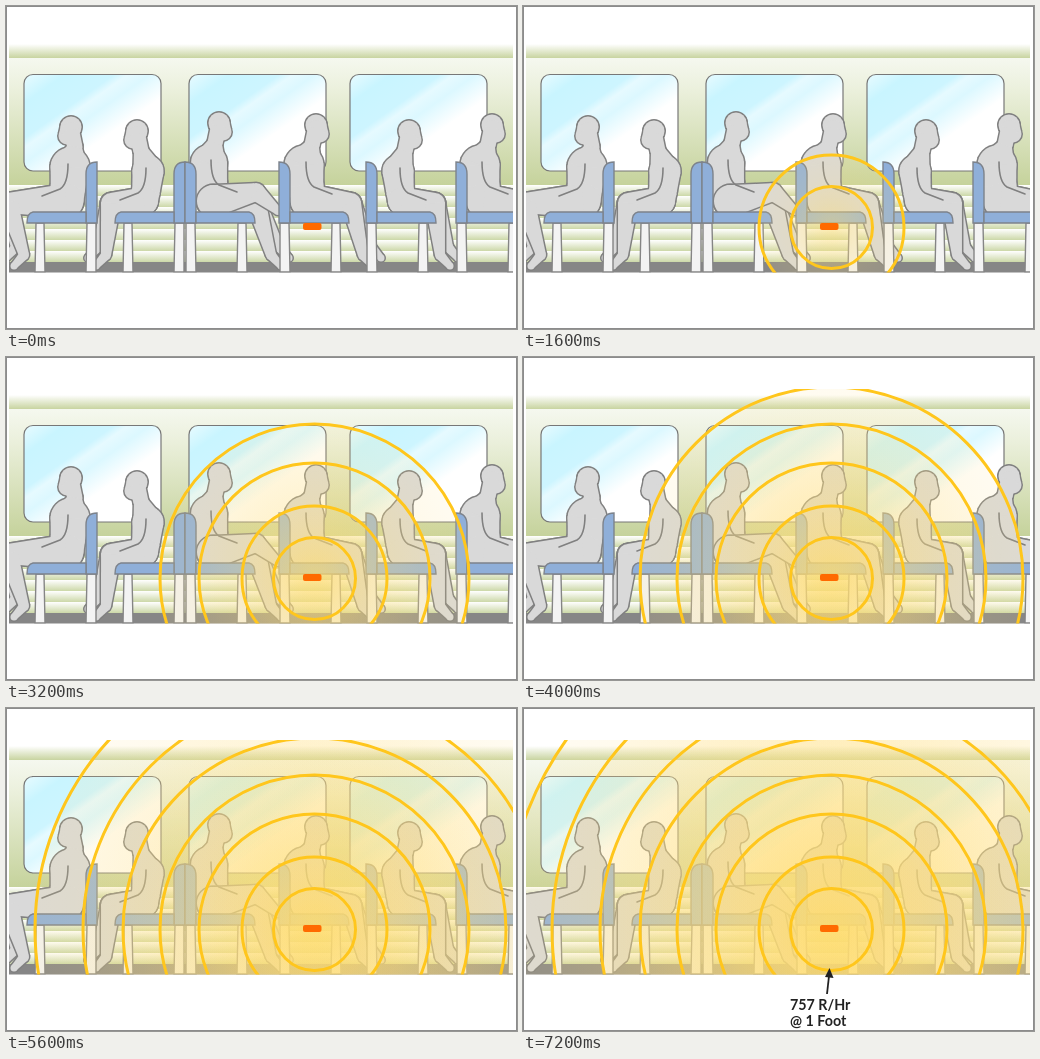
An HTML page that plays this animation: 511x323 px, repeating every 8000 ms.

```html
<!DOCTYPE html>
<html lang="en">
<head>
<meta charset="utf-8">
<style>
  html, body { margin: 0; width: 100%; height: 100%; overflow: hidden; background: #fff; }
  svg { display: block; }
  .ink { fill: #808080; stroke: #808080; stroke-width: 3; stroke-linejoin: round; }
  .skin { fill: #d9d9d9; }
  .crease { fill: none; stroke: #808080; stroke-width: 1.6; stroke-linecap: round; }
  .seat { fill: #8fafd9; stroke: #7d838c; stroke-width: 1.4; }
  .leg { fill: #f3f3f3; stroke: #858585; stroke-width: 1.4; }
  .ring { fill: none; stroke: #ffc61c; stroke-width: 3; }
  text { font: bold 14.3px Lato, "Open Sans", sans-serif; fill: #222; }
</style>
</head>
<body>
<svg width="511" height="323" viewBox="0 0 511 323">
  <defs>
    <clipPath id="car"><rect x="3" y="32" width="504" height="234.5"/></clipPath>
    <linearGradient id="roof" x2="0" y2="1">
      <stop stop-color="#fff"/><stop offset="1" stop-color="#c8d4a0"/>
    </linearGradient>
    <linearGradient id="wall" x2="0" y2="1">
      <stop stop-color="#f5f8ef"/><stop offset=".25" stop-color="#ebf0dc"/><stop offset="1" stop-color="#c5d29b"/>
    </linearGradient>
    <linearGradient id="slat" x2="0" y2="1">
      <stop stop-color="#fff"/><stop offset="1" stop-color="#ccd8a8"/>
    </linearGradient>
    <linearGradient id="glass" x2="1" y2="1">
      <stop stop-color="#e8fbff"/><stop offset=".15" stop-color="#c9f5ff"/><stop offset=".33" stop-color="#cdf5ff"/>
      <stop offset=".38" stop-color="#e6faff"/><stop offset=".46" stop-color="#dcf8ff"/><stop offset=".62" stop-color="#fff"/>
    </linearGradient>
    <radialGradient id="glow">
      <stop stop-color="#ffdc6e" stop-opacity=".3"/><stop offset="1" stop-color="#ffe08a" stop-opacity=".12"/>
    </radialGradient>
  </defs>
  <rect x=".5" y=".5" width="510" height="322" fill="#fff" stroke="#8c8c8c"/>
  <g clip-path="url(#car)">
    <g id="scene"></g>
    <g id="glows"></g>
    <g id="rings"></g>
  </g>
  <rect x="297" y="217" width="18.5" height="7" rx="2" fill="#ff6a00"/>
  <g id="label">
    <path d="M304 286L306 268" stroke="#222" stroke-width="1.8"/>
    <path d="M306.5 260L310.5 270L302 269Z" fill="#222"/>
    <text x="267" y="302">757 R/Hr</text>
    <text x="267" y="318">@ 1 Foot</text>
  </g>
</svg>
<script>
const $ = id => document.getElementById(id);
const rect = (x, y, w, h, fill, extra = '') =>
  `<rect x="${x}" y="${y}" width="${w}" height="${h}" fill="${fill}" ${extra}/>`;

// Chain of tapered segments through joints [x, y, radius]
function limb(...joints) {
  return joints.map(([x, y, r], i) => {
    const dot = `<circle cx="${x}" cy="${y}" r="${r}"/>`;
    if (!i) return dot;
    const [px, py, pr] = joints[i - 1];
    const length = Math.hypot(x - px, y - py), nx = (py - y) / length, ny = (x - px) / length;
    return dot + `<path d="M${px + nx * pr} ${py + ny * pr}L${x + nx * r} ${y + ny * r}` +
      `L${x - nx * r} ${y - ny * r}L${px - nx * pr} ${py - ny * pr}Z"/>`;
  }).join('');
}

const outlined = shape => `<g class="ink">${shape}</g><g class="skin">${shape}</g>`;

// Seated figure: x, y is the head; lean, knee and ankle are measured forward from it
function person({ x, y, dir = 1, build = 1, lean, knee, ankle, crossed }) {
  const chest = [lean, 37, 18 * build], hip = [lean + 4, 195 - y, 16 * build];
  const kneeY = 197 - y, floor = 260 - y;
  const leg = (forward, up) => limb(hip, [knee, kneeY, 10],
    [ankle + forward, floor - 11 - up, 5], [ankle + forward + 10, floor - up, 3.5]);
  const torso = limb([-1, -3, 10.5], [3, 6, 8.5]) +
    limb([-1, 0, 8], [-5, 17, 7.5], chest, [lean + 2, 57, 16 * build], hip);
  const over = crossed ? outlined(limb(hip, [knee, kneeY - 11, 9], [knee + 22, kneeY + 8, 4])) : '';
  return `<g transform="translate(${x} ${y}) scale(${dir} 1)">` +
    outlined(leg(8, 8)) + outlined(torso + leg(0, 0)) + over +
    `<path class="crease" d="M${lean + 2} 34q0 20 8 25l18 7"/></g>`;
}

// Seat with its back at x; dir 1 faces right, -1 faces left
const seat = (x, dir) => `<g transform="translate(${x} 0) scale(${dir} 1)">
  <path class="leg" d="M1 217H10L11 266H1ZM53 217H61L62 266H52Z"/>
  <path class="seat" d="M0 217V156Q11 156 11 168V217Z"/>
  <path class="seat" d="M11 206H64Q70 207 70 217H11Z"/></g>`;

let scene = rect(3, 38, 504, 14, 'url(#roof)') + rect(3, 52, 504, 128, 'url(#wall)');
for (let y = 179; y < 256; y += 11) scene += rect(3, y, 504, 11, 'url(#slat)');
scene += rect(3, 256, 504, 11, '#868686');
for (const x of [18, 183, 344])
  scene += rect(x, 68.5, 137, 96.5, 'url(#glass)', 'rx="9" stroke="#777" stroke-width="1.2"');

const stooped = { y: 128, build: .86, lean: -12, knee: 25, ankle: 30 };
const upright = { y: 122, build: 1.08, lean: -13, knee: 34, ankle: 46 };
scene += [
  { x: 64, y: 124, dir: -1, build: 1.08, lean: 0, knee: 62, ankle: 46 },
  { ...stooped, x: 130, dir: -1 },
  { x: 214, y: 120, lean: -11, knee: 36, ankle: 51, crossed: true },
  { ...upright, x: 311 },
  { ...stooped, x: 404 },
  { ...upright, x: 487 },
].map(person).join('');
for (const [x, dir] of [[91, -1], [179, -1], [179, 1], [273, 1], [360, 1], [450, 1]]) scene += seat(x, dir);
$('scene').innerHTML = scene;

const radii = [41, 72.5, 115.5, 154.5, 191.5, 231.5, 279.5, 326];
const circles = attrs => radii.map(r => `<circle cx="308.5" cy="221.5" r="${r}" ${attrs}/>`).join('');
$('glows').innerHTML = circles('fill="url(#glow)"');
$('rings').innerHTML = circles('class="ring"');

function draw() {
  const step = Math.floor(performance.now() % 8000 / 800);
  const show = (el, on) => el.style.display = on ? '' : 'none';
  for (const id of ['glows', 'rings'])
    [...$(id).children].forEach((circle, i) => show(circle, i < step));
  show($('label'), step === 9);
  requestAnimationFrame(draw);
}
draw();
</script>
</body>
</html>
```
